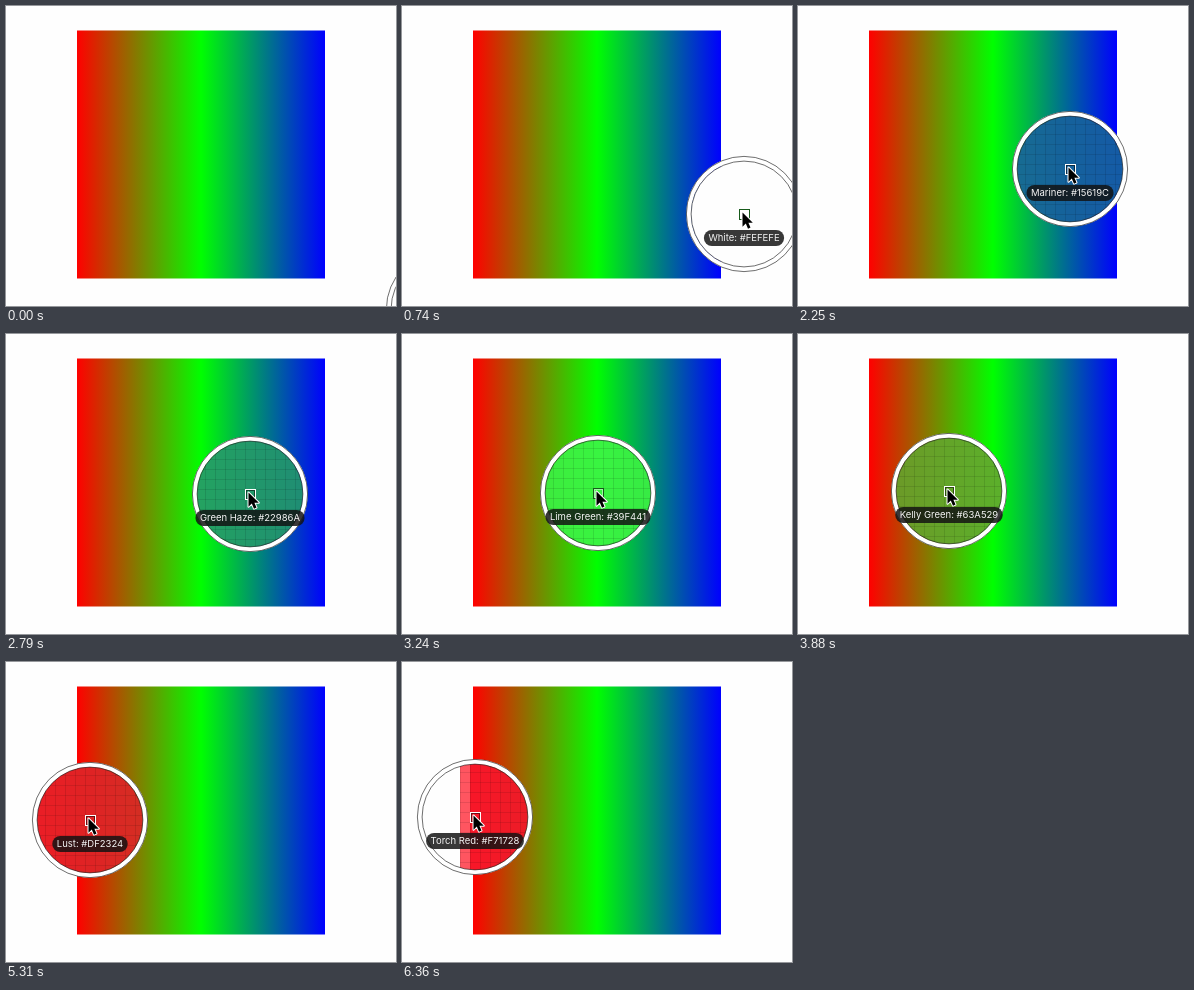
Write an HTML page with a canvas that moves like this. It is 390 px wide and 300 px high and loops after 7530 ms.

```html
<!DOCTYPE html>
<html lang="en">
<head>
<meta charset="utf-8">
<title>Colour picker loupe</title>
<style>
  html, body { margin: 0; width: 100%; height: 100%; overflow: hidden; background: #fefefe; }
  canvas { display: block; width: 390px; height: 300px; }
</style>
</head>
<body>
<canvas id="stage"></canvas>
<script>
const LOOP = 7530, W = 390, H = 300;
const LEFT = 71, RIGHT = 319, TOP = 24.5, CELL = 10, PAPER = '#fefefe';

// Pointer path: [time, x, y]
const path = [
  [240, 438, 303], [1020, 311, 176], [1240, 306, 170], [1800, 289, 164],
  [2250, 272, 163], [2580, 260, 161], [3240, 196, 159], [3340, 184, 159],
  [3800, 156, 157], [4110, 139, 158], [4530, 118, 160], [4870, 101, 161],
  [5310, 84, 158], [5640, 78, 156], [5860, 77, 156], [6360, 73, 155]
];

// Colours the picker reports along the gradient: [x, hex]
const swatches = [
  [73, 0xF71728], [84, 0xDF2324], [118, 0x97641F], [157, 0x5AB12B], [196, 0x39F441],
  [234, 0x26AC58], [272, 0x15619C], [306, 0x1136DC], [319, 0x0C18F8]
];

// Each name applies up to its x
const names = [
  [76, 'Torch Red'], [80, 'Fire Engine Red'], [88, 'Lust'], [95, 'Persian Red'],
  [104, 'Mahogany Brown'], [112, 'Rust'], [125, 'Golden Brown'], [136, 'Olive'],
  [148, 'Limeade'], [162, 'Kelly Green'], [178, 'Harlequin'], [208, 'Lime Green'],
  [222, 'Malachite'], [236, 'Jade'], [248, 'Green Haze'], [264, 'Deep Cerulean'],
  [278, 'Mariner'], [290, 'Cobalt'], [299, 'Persian Blue'], [313, 'Palatinate Blue'],
  [319, 'Blue'], [Infinity, 'White']
];

const canvas = document.getElementById('stage');
const ctx = canvas.getContext('2d');
const ratio = window.devicePixelRatio || 1;
canvas.width = W * ratio;
canvas.height = H * ratio;
ctx.scale(ratio, ratio);

const slope = (i, k) => (path[i + 1][k] - path[i][k]) / (path[i + 1][0] - path[i][0]);

// Harmonic mean keeps the curve from overshooting its points
function tangent(i, k) {
  if (i === 0) return slope(0, k);
  if (i === path.length - 1) return 0;
  const a = slope(i - 1, k), b = slope(i, k);
  return a * b > 0 ? 2 * a * b / (a + b) : 0;
}

function pointerAt(time) {
  const last = path.length - 1;
  const t = Math.min(Math.max(time, path[0][0]), path[last][0]);
  let i = 0;
  while (i < last - 1 && t > path[i + 1][0]) i++;
  const span = path[i + 1][0] - path[i][0], u = (t - path[i][0]) / span, v = 1 - u;
  return [1, 2].map(k => Math.round(
    path[i][k] * (1 + 2 * u) * v * v + path[i + 1][k] * u * u * (3 - 2 * u) +
    span * u * v * (tangent(i, k) * v - tangent(i + 1, k) * u)));
}

function hexAt(x) {
  if (x < LEFT + 0.5 || x > RIGHT) return '#FEFEFE';
  let i = 0;
  while (i < swatches.length - 2 && x > swatches[i + 1][0]) i++;
  const [x0, a] = swatches[i], [x1, b] = swatches[i + 1];
  const u = Math.max(0, (x - x0) / (x1 - x0));
  return '#' + [16, 8, 0].map(shift => {
    const from = a >> shift & 255, to = b >> shift & 255;
    return Math.round(from + (to - from) * u).toString(16).padStart(2, '0');
  }).join('').toUpperCase();
}

function circle(x, y, r) {
  ctx.beginPath();
  ctx.arc(x, y, r, 0, Math.PI * 2);
}

function drawGradient() {
  ctx.fillStyle = PAPER;
  ctx.fillRect(0, 0, W, H);
  const fill = ctx.createLinearGradient(LEFT, 0, RIGHT, 0);
  fill.addColorStop(0, '#f00');
  fill.addColorStop(0.5, '#0f0');
  fill.addColorStop(1, '#00f');
  ctx.fillStyle = fill;
  ctx.fillRect(LEFT, TOP, RIGHT - LEFT, 248);
}

function drawLens(x, y) {
  ctx.save();
  circle(x, y, 53);
  ctx.clip();
  for (let i = -6; i <= 6; i++) {
    const left = x + i * CELL - 5, column = x + i, color = hexAt(column);
    ctx.fillStyle = column === LEFT + 1 ? '#ff5560' : color;
    ctx.fillRect(left, y - 60, CELL, 120);
    if (color === '#FEFEFE') continue;
    ctx.fillStyle = 'rgba(0,0,0,.1)';
    ctx.fillRect(left, y - 60, 1, 120);
    for (let j = -6; j <= 6; j++) ctx.fillRect(left, y + j * CELL - 5, CELL, 1);
  }
  ctx.restore();

  circle(x, y, 55.3);
  ctx.strokeStyle = '#fff';
  ctx.lineWidth = 4.8;
  ctx.stroke();
  ctx.strokeStyle = 'rgba(40,40,40,.75)';
  ctx.lineWidth = 0.9;
  for (const r of [57.6, 52.9]) {
    circle(x, y, r);
    ctx.stroke();
  }
}

function drawTarget(x, y) {
  const bright = x > 165 && x < 225 || x > RIGHT;
  ctx.lineWidth = 1;
  ctx.strokeStyle = bright ? 'rgba(255,255,255,.5)' : 'rgba(0,0,0,.55)';
  ctx.strokeRect(x - 3.5, y - 3.5, 8, 8);
  ctx.strokeStyle = bright ? '#175a1b' : '#fff';
  ctx.strokeRect(x - 4.5, y - 4.5, 10, 10);
}

function drawLabel(x, y) {
  const text = names.find(([limit]) => x <= limit)[1] + ': ' + hexAt(x);
  ctx.font = '9.5px Inter, Roboto, sans-serif';
  ctx.textAlign = 'center';
  ctx.textBaseline = 'middle';
  const width = ctx.measureText(text).width + 9;
  ctx.beginPath();
  ctx.roundRect(x - width / 2, y + 16, width, 16, 8);
  ctx.fillStyle = 'rgba(18,18,18,.84)';
  ctx.fill();
  ctx.fillStyle = '#f4f4f4';
  ctx.fillText(text, x, y + 24.5);
}

function drawCursor(x, y) {
  const arrow = new Path2D('M0 0V14.2L3.3 11.1L5.5 16.2L8 15.1L5.9 10.2H10.3Z');
  ctx.save();
  ctx.translate(x - 1.5, y - 1.5);
  ctx.lineJoin = 'round';
  ctx.lineWidth = 2;
  ctx.strokeStyle = '#fff';
  ctx.stroke(arrow);
  ctx.fillStyle = '#000';
  ctx.fill(arrow);
  ctx.restore();
}

const start = performance.now();

function frame() {
  const [x, y] = pointerAt((performance.now() - start) % LOOP);
  drawGradient();
  drawLens(x, y);
  drawTarget(x, y);
  drawLabel(x, y);
  drawCursor(x, y);
  requestAnimationFrame(frame);
}
frame();
</script>
</body>
</html>
```
